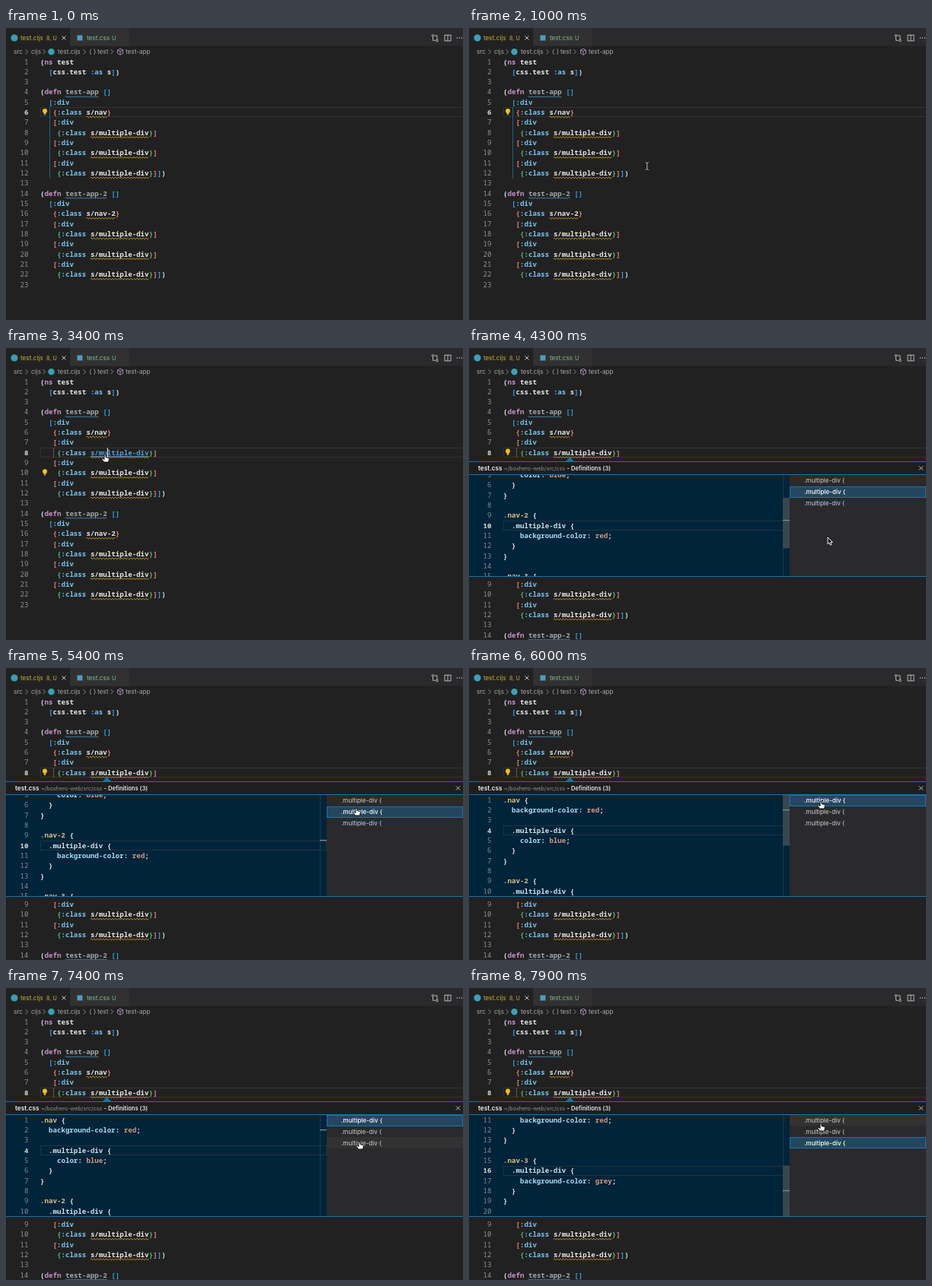
An HTML page with a canvas for the animation above (8 s loop, 600 by 384 pixels).

```html
<!DOCTYPE html>
<html lang="en">
<head>
<meta charset="utf-8">
<title>Go to definition</title>
<style>
  html, body { margin: 0; width: 100%; height: 100%; overflow: hidden; background: #222122; }
  canvas { display: block; width: 600px; height: 384px; }
</style>
</head>
<body>
<canvas id="stage"></canvas>
<script>
const W = 600, H = 384, LOOP = 8000;
const canvas = document.getElementById('stage');
const ctx = canvas.getContext('2d');
const dpr = window.devicePixelRatio || 1;
canvas.width = W * dpr;
canvas.height = H * dpr;

const mono = weight => `${weight} 9.15px "Noto Sans Mono", "DejaVu Sans Mono", monospace`;
const CODE = mono(600), NUM = mono(400);
const ui = (size, weight = 400) => `${weight} ${size}px Inter, Roboto, sans-serif`;
const CW = 5.49, LH = 13.32, LEFT = 45, FIRST = 44.3;

const C = {
  editor: '#222122', bar: '#2a292b', tab: '#313132', text: '#e4e4e4', dim: '#a8a8a8',
  num: '#8f8f8f', numOn: '#d6d6d6', key: '#74c6ee', form: '#c994c4', name: '#a4a6a6',
  warn: '#cfa81c', info: '#4b96c4', border: '#1673ad', peek: '#00243a', list: '#2a292b',
  green: '#74c493', gold: '#cfae2c'
};
const BRACKETS = ['#e4e4e4', '#2f9fe0', '#e5806c', '#4fbb6c'];

const block = (name, nav) => [
  `(defn ${name} []`, '  [:div', `   {:class s/${nav}}`,
  '   [:div', '    {:class s/multiple-div}]',
  '   [:div', '    {:class s/multiple-div}]',
  '   [:div', '    {:class s/multiple-div}]])'
];
const SOURCE = ['(ns test', '  [css.test :as s])', '',
  ...block('test-app', 'nav'), '', ...block('test-app-2', 'nav-2'), ''];

const STYLES = [
  '.nav {', '  background-color: red;', '', '  .multiple-div {', '    color: blue;', '  }', '}', '',
  '.nav-2 {', '  .multiple-div {', '    background-color: red;', '  }', '}', '',
  '.nav-3 {', '  .multiple-div {', '    background-color: grey;', '  }', '}', ''
];

const T = { click: 1500, link: 2950, caret: 3200, peek: 3600, bulb: 3700, first: 5750, third: 7450 };
const PEEK = { top: 149, body: 167, bottom: 300, split: 421, row: 14.67 };

// Pointer path: time, x, y
const PATH = [
  [150, 288, 230], [900, 240, 185], [1300, 201, 164], [1600, 200, 163], [2000, 121, 132],
  [2700, 128, 139], [3300, 130, 140], [3600, 130, 140], [4250, 471, 249], [4600, 471, 249],
  [5300, 460, 184], [5500, 460, 184], [5700, 462, 175], [6100, 462, 175], [6750, 463, 181],
  [7150, 463, 181], [7350, 464, 202], [7550, 464, 202], [7880, 462, 178], [8000, 462, 178]
];

function pointerAt(t) {
  if (t < PATH[0][0]) return null;
  const i = Math.max(1, PATH.findIndex(p => p[0] >= t));
  const [t0, x0, y0] = PATH[i - 1], [t1, x1, y1] = PATH[i];
  const k = (t - t0) / (t1 - t0), e = k * k * (3 - 2 * k);
  return { x: x0 + (x1 - x0) * e, y: y0 + (y1 - y0) * e };
}

function rect(x, y, w, h, color) {
  ctx.fillStyle = color;
  ctx.fillRect(x, y, w, h);
}
function text(s, x, y, color, font, align = 'left') {
  ctx.font = font;
  ctx.fillStyle = color;
  ctx.textAlign = align;
  ctx.fillText(s, x, y);
}
function stroke(points, color, width = 1, close = false) {
  ctx.strokeStyle = color;
  ctx.lineWidth = width;
  ctx.beginPath();
  points.forEach(([x, y]) => ctx.lineTo(x, y));
  if (close) ctx.closePath();
  ctx.stroke();
}
function disc(x, y, r, color) {
  ctx.fillStyle = color;
  ctx.beginPath();
  ctx.arc(x, y, r, 0, Math.PI * 2);
  ctx.fill();
}
function frame(x, y, w, h, color, width = 1) {
  ctx.strokeStyle = color;
  ctx.lineWidth = width;
  ctx.strokeRect(x, y, w, h);
}
function squiggle(x, y, w, color) {
  const points = [];
  for (let d = 0; d <= w; d += 0.5) points.push([x + d, y - Math.sin(d * Math.PI / 2) * 0.8]);
  stroke(points, color, 1);
}
const chevron = x => stroke([[x - 1.5, 28.2], [x + 1.5, 31.2], [x - 1.5, 34.2]], '#929292', 0.9);
const cross = (x, y, r, color) => {
  stroke([[x - r, y - r], [x + r, y + r]], color, 0.9);
  stroke([[x + r, y - r], [x - r, y + r]], color, 0.9);
};

function drawChrome() {
  rect(0, 0, W, 23.5, C.bar);
  rect(0, 0, 84, 24, C.editor);
  rect(84.5, 0, 77, 23.5, C.tab);
  disc(11, 13, 4.6, '#3c9fb4');
  text('test.cljs', 19, 16, C.gold, ui(8.2));
  text('8, U', 53, 16, C.gold, ui(7.2));
  cross(76, 13, 2.5, '#dcdcdc');
  rect(93.5, 9.5, 7, 7, '#4b9cc8');
  text('test.css', 106, 16, C.green, ui(8.2));
  text('U', 139, 16, C.green, ui(7.2));

  // Toolbar
  const ink = '#c8c8c8';
  ctx.strokeStyle = ink;
  ctx.lineWidth = 0.9;
  for (const [x, y] of [[560.5, 10], [566, 16.5]]) {
    ctx.beginPath();
    ctx.arc(x, y, 1.3, 0, 7);
    ctx.stroke();
  }
  stroke([[560.5, 11.5], [560.5, 16.3], [564, 16.3]], ink, 0.9);
  stroke([[566, 15], [566, 10], [562.7, 10]], ink, 0.9);
  frame(576, 9.3, 8, 7.6, ink, 0.9);
  stroke([[580, 9.3], [580, 17]], ink, 0.9);
  for (const x of [592.5, 595.5, 598.5]) disc(x, 13, 0.75, ink);

  // Breadcrumbs
  const crumb = (s, x) => text(s, x, 34.2, C.dim, ui(8.2));
  crumb('src', 10);
  crumb('cljs', 33);
  crumb('test.cljs', 68);
  crumb('{ }', 109);
  crumb('test', 120);
  crumb('test-app', 157);
  [27, 50, 103, 139].forEach(chevron);
  disc(59.5, 31.2, 4.2, '#3c9fb4');
  stroke([[150, 27.3], [153.5, 29], [153.5, 33.4], [150, 35.2], [146.5, 33.4], [146.5, 29]], '#b9a0cf', 0.8, true);
  stroke([[146.5, 29], [150, 30.9], [153.5, 29]], '#b9a0cf', 0.8);
  stroke([[150, 30.9], [150, 35.2]], '#b9a0cf', 0.8);
}

function drawBulb(y) {
  disc(51, y - 1.2, 3, '#f0c020');
  rect(49.6, y + 0.8, 2.8, 2.2, '#f0c020');
  rect(49.8, y + 3.4, 2.4, 0.9, '#b8b8b8');
}

function drawSource(t) {
  const open = t >= T.peek;
  const active = t < T.click ? 6 : t < T.caret ? 10 : 8;
  const lineY = n => FIRST + (n - 1) * LH + (open && n > 8 ? 12 * LH : 0);
  const colX = c => LEFT + c * CW;

  const ay = lineY(active);
  frame(LEFT + 0.5, Math.round(ay - 6.4) + 0.5, W, 12, '#333233');
  if (active === 8) rect(62, ay - 6.6, 1, LH, '#7d4a42');
  else rect(57, lineY(6) - 6.6, 1, LH * 7, '#1d5f80');

  if (active === 10) {
    for (const [n, c] of [[9, 3], [10, 27]]) {
      rect(colX(c), lineY(n) - 6, CW, 12, '#5d5656');
      frame(colX(c) + 0.3, lineY(n) - 5.8, CW - 0.6, 11.6, '#827c7c', 0.6);
    }
  }

  let depth = 0;
  SOURCE.forEach((line, i) => {
    const n = i + 1, y = lineY(n), base = y + 3.2;
    text(n, 29.5, base, n === active ? C.numOn : C.num, n === active ? CODE : NUM, 'right');
    for (const m of line.matchAll(/[()[\]{}]|[^\s()[\]{}]+/g)) {
      const s = m[0], x = colX(m.index), w = s.length * CW;
      let color = C.text;
      if ('([{'.includes(s)) color = BRACKETS[depth++];
      else if (')]}'.includes(s)) color = BRACKETS[--depth];
      else if (s[0] === ':') color = C.key;
      else if (s === 'ns' || s === 'defn') color = C.form;
      else if (s.startsWith('test-app')) {
        color = C.name;
        squiggle(x, y + 6.2, w, C.info);
      } else if (s.startsWith('s/')) {
        squiggle(x, y + 6.2, w, C.warn);
        if (n === 8 && t >= T.link && !open) {
          color = '#4f9fd6';
          rect(x, y + 4.6, w, 0.8, color);
        }
      }
      text(s, x, base, color, CODE);
    }
  });

  drawBulb(lineY(t < T.click ? 6 : t < T.bulb ? 10 : 8) - 0.8);

  const since = t - (active === 10 ? T.click : T.caret);
  if (active !== 6 && !open && since % 1060 < 530) {
    rect(colX(active === 10 ? 28 : 16), ay - 6.2, 1.2, 12.6, '#d8d8d8');
  }
}

function drawStyleLine(s, y) {
  const put = (part, at, color) => text(part, LEFT + at * CW, y, color, CODE);
  const rule = s.match(/^(\s*)([\w-]+):\s([a-z]+);$/);
  if (rule) {
    const at = rule[1].length, end = at + rule[2].length;
    put(rule[2], at, '#a9dcf5');
    put(':', end, C.text);
    put(rule[3], end + 2, '#d39a80');
    put(';', s.length - 1, C.text);
    return;
  }
  const at = s.search(/\S/);
  if (at < 0) return;
  const name = s.trim().split(' ')[0];
  put(name, at, name[0] !== '.' ? C.text : at ? '#cfe0e8' : '#d7c08a');
  if (s.endsWith(' {')) put('{', s.length - 1, C.text);
}

function drawPeek(t, pointer) {
  const { top, body, bottom, split, row } = PEEK;
  const choice = t < T.first ? 1 : t < T.third ? 0 : 2;
  const changed = [T.first, T.peek, T.third][choice];
  const scroll = [0, 4.5, 10][choice] * LH;
  const current = [4, 10, 16][choice];

  rect(0, top, W, bottom - top, '#1e1e1f');
  ctx.fillStyle = C.border;
  ctx.beginPath();
  ctx.moveTo(127, top);
  ctx.lineTo(132.5, top - 5);
  ctx.lineTo(138, top);
  ctx.fill();
  text('test.css', 12, 160.8, '#f2f2f2', ui(8.2, 600));
  text('~/boxhero-web/src/css', 46, 160.8, '#929292', ui(7.2));
  text('- Definitions (3)', 128.5, 160.8, '#e4e4e4', ui(7.6, 600));
  cross(593.5, 158, 2.6, '#c8c8c8');

  rect(0, body, split, bottom - body, C.peek);
  rect(split, body, W - split, bottom - body, C.list);

  ctx.save();
  ctx.beginPath();
  ctx.rect(0, body, split, bottom - body);
  ctx.clip();
  const lineY = n => body + 6.6 + (n - 1) * LH - scroll;
  frame(LEFT + 0.5, Math.round(lineY(current) - 6.6) + 0.5, split - LEFT - 1, 12, '#1f3542');
  STYLES.forEach((s, i) => {
    const on = i + 1 === current, base = lineY(i + 1) + 3.2;
    text(i + 1, 29.5, base, on ? C.numOn : '#81898d', on ? CODE : NUM, 'right');
    drawStyleLine(s, base);
  });
  rect(412, body, 1, bottom - body, '#1c3a4b');
  ctx.globalAlpha = Math.max(0, Math.min(1, 1 - (t - changed - 750) / 600));
  rect(412, body + scroll / 2, 9, 66.6, '#37474f');
  ctx.globalAlpha = 1;
  rect(412, body + (current - 1) * 6.66 - 1, 9, 1.3, '#7c8a90');
  ctx.restore();

  const hover = pointer.x > split ? Math.floor((pointer.y - body) / row) : -1;
  for (let i = 0; i < 3; i++) {
    const y = Math.round(body + i * row);
    if (i === choice) {
      rect(split, y, W - split, 15, '#24475f');
      frame(split + 0.5, y + 0.5, W - split - 1, 14, C.border);
    } else if (i === hover) {
      rect(split, y, W - split, row, '#323233');
    }
    const on = i === choice;
    text('.multiple-div {', 440, body + i * row + 10.2, on ? '#ffffff' : '#cfcfcf', ui(8.1, on ? 500 : 400));
  }

  for (const y of [top, body - 1, bottom]) rect(0, y, W, 1, C.border);
}

function outline(d, x, y, fill, edge) {
  ctx.save();
  ctx.translate(x, y);
  const path = new Path2D(d);
  ctx.lineJoin = 'round';
  ctx.lineWidth = 1;
  ctx.strokeStyle = edge;
  ctx.fillStyle = fill;
  ctx.fill(path);
  ctx.stroke(path);
  ctx.restore();
}

function drawPointer(t, { x, y }) {
  const overList = t >= T.peek && x > PEEK.split;
  const overRow = overList && y < PEEK.body + PEEK.row * 3;
  const overLink = t >= T.link && t < T.peek;
  if (overRow || overLink) {
    outline('M-1 0.6Q0-0.6 1 0.6V3.6L4.8 4.6Q5.6 5 5.4 6L4.6 10H-1.4L-4 6.4Q-4 5-2.6 5.4L-1 6.6Z', x, y, '#fff', '#111');
  } else if (overList) {
    outline('M0 0V8.8L2 7L3.4 10.2L5 9.5L3.6 6.4H6.4Z', x, y, '#111', '#eee');
  } else {
    const bar = [[x, y - 4], [x, y + 4]];
    const caps = [-1, 1].map(s => [[x - 2, y + s * 5], [x, y + s * 4], [x + 2, y + s * 5]]);
    for (const p of [bar, ...caps]) stroke(p, '#111', 2);
    for (const p of [bar, ...caps]) stroke(p, '#dedede', 0.9);
  }
}

function draw(t) {
  ctx.setTransform(dpr, 0, 0, dpr, 0, 0);
  rect(0, 0, W, H, C.editor);
  drawSource(t);
  drawChrome();
  const pointer = pointerAt(t);
  if (t >= T.peek) drawPeek(t, pointer);
  if (pointer) drawPointer(t, pointer);
}

const start = performance.now();
function tick(now) {
  draw(Math.max(0, now - start) % LOOP);
  requestAnimationFrame(tick);
}
draw(0);
requestAnimationFrame(tick);
</script>
</body>
</html>
```
